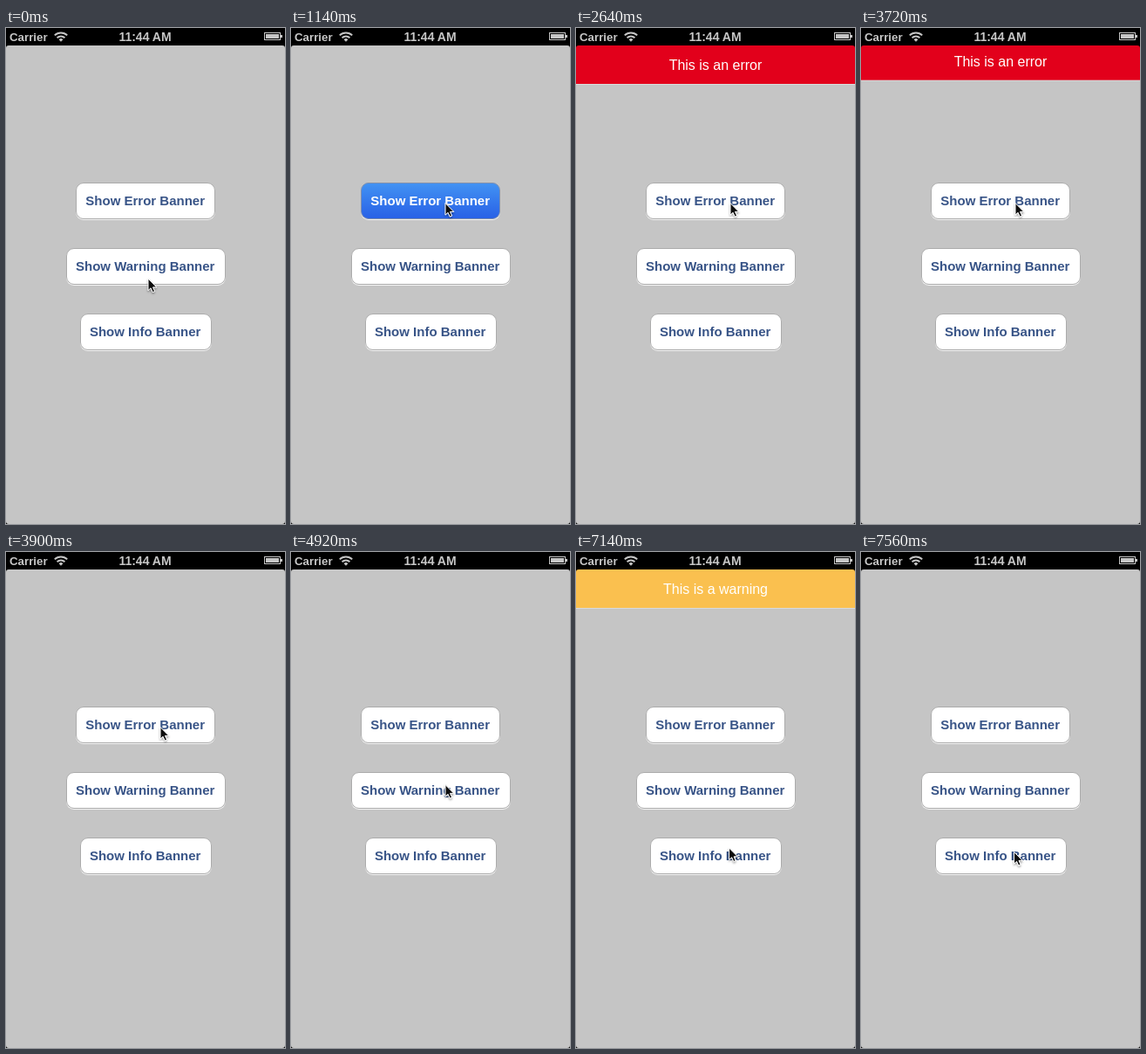
Write an HTML page that moves like this. It is 320x568 px and loops after 8000 ms.

```html
<!DOCTYPE html>
<html lang="en">
<head>
<meta charset="utf-8">
<title>Alert banners</title>
<style>
  html, body { margin: 0; width: 100%; height: 100%; overflow: hidden; background: #000; }
  svg { display: block; width: 320px; height: 568px; }
  text { font-family: "Liberation Sans", Arial, sans-serif; text-anchor: middle; }
  .status text { font-weight: bold; font-size: 14px; fill: #c6c6c6; }
  .status .carrier { font-size: 13.3px; text-anchor: start; }
  .button text { font-weight: bold; font-size: 15px; fill: #385487; }
  .button .face { fill: #fff; stroke: #ababab; }
  .button .glint { fill: #f4f4f4; }
  .pressed text { fill: #fff; }
  .pressed .face { fill: url(#blue); stroke: #8291ad; }
  .banner text { font-size: 16px; fill: #fff; }
</style>
</head>
<body>
<svg viewBox="0 0 320 568">
  <defs>
    <linearGradient id="blue" x2="0" y2="1">
      <stop offset="0" stop-color="#4293f3"/>
      <stop offset="1" stop-color="#2860e6"/>
    </linearGradient>
    <filter id="shadow" x="-50%" y="-50%" width="200%" height="200%">
      <feDropShadow dx="0" dy="1.5" stdDeviation="1" flood-opacity=".4"/>
    </filter>
  </defs>

  <rect y="20" width="320" height="548" fill="#c5c5c5"/>
  <g id="buttons"></g>
  <g id="banners"></g>

  <g class="status">
    <rect width="320" height="20"/>
    <text class="carrier" x="4" y="15">Carrier</text>
    <text x="159.5" y="15">11:44 AM</text>
    <g fill="none" stroke="#c6c6c6" stroke-width="2">
      <path d="M55.8 8.4A10.2 10.2 0 0 1 70.2 8.4M58.6 11.3A6.2 6.2 0 0 1 67.4 11.3"/>
      <path d="M60.6 13.2A3.4 3.4 0 0 1 65.4 13.2L63 15.8Z" fill="#c6c6c6" stroke="none"/>
      <rect x="296.5" y="5.5" width="18" height="8" stroke-width="1"/>
    </g>
    <path d="M298 7h15v5h-15zM315 8h2v3h-2z" fill="#c6c6c6"/>
  </g>
  <path d="M0 20h3q-3 0-3 3zM320 20h-3q3 0 3 3zM0 568h3q-3 0-3-3zM320 568h-3q3 0 3-3z"/>

  <g id="cursor" filter="url(#shadow)">
    <path d="M0 0V13.6L3.1 10.8L5.2 15.6L7.6 14.6L5.5 9.9H9.8Z" fill="#111" stroke="#fff" stroke-width="1"/>
  </g>
</svg>

<script>
const LOOP = 8000, STEP = 60, BANNER_HEIGHT = 45;

const buttons = [
  { label: 'Show Error Banner', y: 177, width: 160, press: [1140, 1260] },
  { label: 'Show Warning Banner', y: 252, width: 183, press: [4980, 5040] },
  { label: 'Show Info Banner', y: 327, width: 151, press: [LOOP, LOOP] }
];
const banners = [
  { label: 'This is an error', color: '#e2001b', show: [1230, 1480], hide: [3680, 3890] },
  { label: 'This is a warning', color: '#fac04f', show: [5000, 5220], hide: [7290, 7510] }
];
const moves = [
  { time: [30, 840], from: [163, 287], to: [177, 200.5] },
  { time: [4290, 4860], from: [177, 200.5], to: [177, 266.5] },
  { time: [6450, 7260], from: [177, 266.5], to: [175.5, 343.5] }
];

const byId = id => document.getElementById(id);

function addGroup(parent, className, markup) {
  const group = document.createElementNS('http://www.w3.org/2000/svg', 'g');
  group.setAttribute('class', className);
  group.innerHTML = markup;
  return byId(parent).appendChild(group);
}

for (const button of buttons) {
  const { label, y, width } = button, x = Math.round(160 - width / 2);
  button.node = addGroup('buttons', 'button', `
    <rect class="glint" x="${x}" y="${y + 1}" width="${width}" height="42" rx="9"/>
    <rect class="face" x="${x + .5}" y="${y + .5}" width="${width - 1}" height="41" rx="8.5"/>
    <text x="159.7" y="${y + 26}">${label}</text>`);
}
for (const banner of banners) {
  banner.node = addGroup('banners', 'banner', `
    <rect y="20" width="320" height="44" fill="${banner.color}"/>
    <rect y="64" width="320" height="1" fill="#fff" opacity=".35"/>
    <text x="160" y="48">${banner.label}</text>`);
}

// Eased progress of t through the span, from 0 to 1.
function progress(t, [start, end]) {
  const p = Math.min(1, Math.max(0, (t - start) / (end - start)));
  return p * p * (3 - 2 * p);
}

function draw(t) {
  for (const { node, press } of buttons) {
    node.classList.toggle('pressed', t >= press[0] && t < press[1]);
  }
  for (const { node, show, hide } of banners) {
    const shown = progress(t, show) - progress(t, hide);
    node.setAttribute('transform', `translate(0 ${(shown - 1) * BANNER_HEIGHT})`);
  }
  const move = moves.findLast(m => t >= m.time[0]) || moves[0];
  const p = progress(t, move.time);
  const [x, y] = move.from.map((start, i) => start + (move.to[i] - start) * p);
  byId('cursor').setAttribute('transform', `translate(${x} ${y})`);
}

const startTime = performance.now();
function tick() {
  const t = (performance.now() - startTime) % LOOP;
  draw(Math.floor(t / STEP) * STEP);
  requestAnimationFrame(tick);
}
tick();
</script>
</body>
</html>
```
